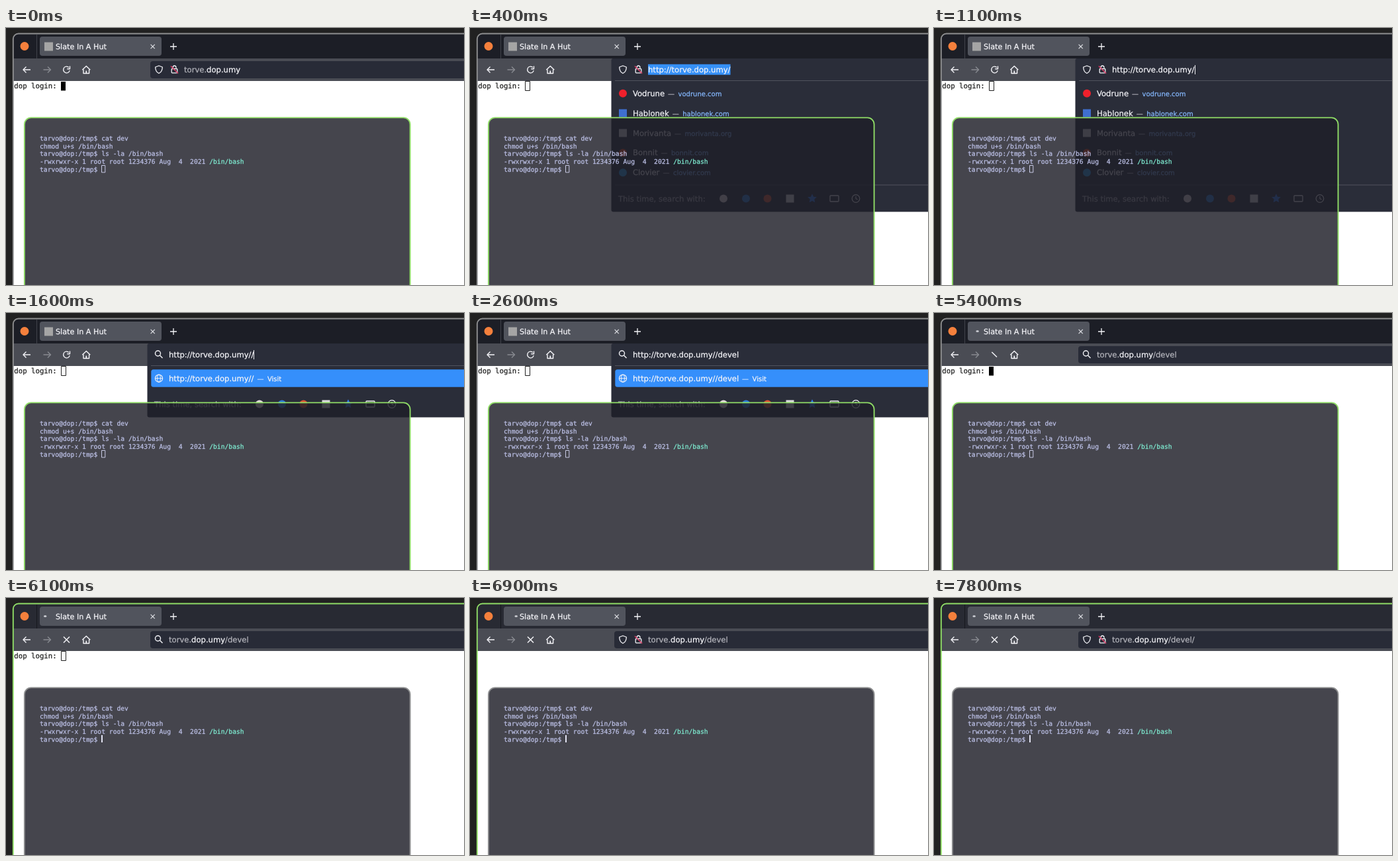
These frames come from a looping animation (692x388 px, 8 s). An HTML page with a canvas:

```html
<!DOCTYPE html>
<html lang="en">
<head>
<meta charset="utf-8">
<title>Browser and terminal</title>
<style>
  html, body { margin: 0; width: 100%; height: 100%; overflow: hidden; background: #212121; }
  canvas { display: block; }
</style>
</head>
<body>
<canvas id="stage" width="692" height="388"></canvas>
<script>
const ctx = document.getElementById('stage').getContext('2d');
const LOOP = 8000;
const SANS = '"DejaVu Sans", sans-serif';
const MONO = '"DejaVu Sans Mono", monospace';
const WHITE = '#f4f4f8', MUTED = '#b2b3ba', GREEN = '#8fdc66', GREY = '#8e8f90';
const HOST = 'http://torve.dop.umy/';
const URL_SIZE = 11.6;

// Moments when the loading dot is redrawn
const DOT_TIMES = [5400, 5700, 6000, 6100, 6200, 6300, 6800, 6900, 7300, 7400, 7500, 7800];

// Typed address: start time, text after the host, caret index from the end (-1 hides it)
const TYPING = [
  [1600, '/', 0], [2100, '/de', 0], [2300, '/devel', 0], [2600, '/devel', -1],
  [3000, '/devel', 5], [3500, 'devel', 5], [3800, 'devel', -1]
];

const SITES = [
  ['Vodrune', 'vodrune.com', '#f0202c', 'circle'],
  ['Hablonek', 'hablonek.com', '#3f6fd0', 'square'],
  ['Morivanta', 'morivanta.org', '#d8d8da', 'square'],
  ['Bonnit', 'bonnit.com', '#f04a22', 'circle'],
  ['Clovier', 'clovier.com', '#2a9fe8', 'circle']
];

// A hairline outline gives the slightly heavy look of rescaled screen text
function text(str, x, y, size, color, family = SANS) {
  ctx.font = `${size}px ${family}`;
  ctx.fillStyle = ctx.strokeStyle = color;
  ctx.lineWidth = 0.25;
  ctx.fillText(str, x, y);
  ctx.strokeText(str, x, y);
  return x + ctx.measureText(str).width;
}

function rect(x, y, w, h, color) {
  ctx.fillStyle = color;
  ctx.fillRect(x, y, w, h);
}

function box(x, y, w, h, r, fill, stroke, width = 1) {
  ctx.beginPath();
  ctx.roundRect(x, y, w, h, r);
  if (fill) { ctx.fillStyle = fill; ctx.fill(); }
  if (stroke) { ctx.strokeStyle = stroke; ctx.lineWidth = width; ctx.stroke(); }
}

function line(points, color, width = 1.3) {
  ctx.beginPath();
  points.forEach(([x, y]) => ctx.lineTo(x, y));
  ctx.strokeStyle = color;
  ctx.lineWidth = width;
  ctx.stroke();
}

function ring(x, y, rx, color, width = 1.2, ry = rx, from = 0, to = Math.PI * 2) {
  ctx.beginPath();
  ctx.ellipse(x, y, rx, ry, 0, from, to);
  ctx.strokeStyle = color;
  ctx.lineWidth = width;
  ctx.stroke();
}

function disc(x, y, rx, color, ry = rx) {
  ctx.beginPath();
  ctx.ellipse(x, y, rx, ry, 0, 0, Math.PI * 2);
  ctx.fillStyle = color;
  ctx.fill();
}

function badge(shape, x, y, color) {
  if (shape === 'circle') disc(x, y, 6, color);
  else rect(x - 6, y - 6, 12, 12, color);
}

function cross(x, y, r, color, width) {
  line([[x - r, y - r], [x + r, y + r]], color, width);
  line([[x + r, y - r], [x - r, y + r]], color, width);
}

function arrow(x, y, dir, color) {
  line([[x - 5.5, y], [x + 5.5, y]], color, 1.4);
  line([[x + dir, y - 4.5], [x + dir * 5.5, y], [x + dir, y + 4.5]], color, 1.4);
}

function searchIcon() {
  ring(229.5, 61, 4, WHITE, 1.4);
  line([[232.5, 64], [236.5, 68]], WHITE, 1.5);
}

function securityIcons() {
  ctx.beginPath();
  ctx.moveTo(231, 57);
  ctx.lineTo(236.3, 59);
  ctx.quadraticCurveTo(236.3, 66, 231, 68.5);
  ctx.quadraticCurveTo(225.7, 66, 225.7, 59);
  ctx.closePath();
  ctx.strokeStyle = WHITE;
  ctx.lineWidth = 1.3;
  ctx.stroke();
  ring(254.5, 60.5, 2.6, WHITE, 1.3, 3.5, Math.PI, 0);
  box(250.2, 61.5, 8.6, 6.3, 1, null, WHITE, 1.3);
  line([[249, 57.5], [260, 68.5]], '#e2406c', 1.5);
}

function reloadIcon(t) {
  if (t < 5400) {
    ring(91.5, 63, 4.8, WHITE, 1.4, 4.8, 0.25, 5.5);
    line([[96.5, 57.5], [96.5, 61.7], [92.3, 61.7]], WHITE, 1.4);
  } else if (t < 5700) {
    line([[87.3, 59], [95, 66.5]], WHITE, 1.5);
  } else {
    cross(91.5, 63, 4.5, WHITE, 1.5);
  }
}

function tabs(t, active) {
  rect(10, 8, 682, 38, active ? '#282a33' : '#1c1e26');
  disc(28, 27.5, 6.5, '#f5803c');
  rect(46, 10, 1, 36, active ? '#17181f' : '#41434b');
  box(51, 13, 184, 29, 4, '#51545d');
  if (t < 5400) {
    rect(58, 21.5, 13, 13, '#a5a5a5');
  } else {
    const at = DOT_TIMES.filter(m => m <= t).pop();
    const x = 64.5 - 5.3 * Math.cos((at - 6100) / 545 * Math.PI * 2);
    disc(x, 27.5, 2.3, '#c6c8ce', 1.6);
  }
  text('Slate In A Hut', 75, 32, 11.2, WHITE);
  cross(221.7, 28, 3.1, '#dddee3', 1.2);
  line([[248, 28], [258, 28]], WHITE);
  line([[253, 23], [253, 33]], WHITE);
}

function toolbar(t) {
  rect(10, 46, 682, 34, '#4a4c54');
  arrow(31.5, 63, -1, WHITE);
  arrow(62, 63, 1, '#888a91');
  reloadIcon(t);
  line([[115.3, 63.2], [121.3, 57.5], [127.3, 63.2]], WHITE, 1.4);
  line([[117, 62.5], [117, 68.5], [125.6, 68.5], [125.6, 62.5]], WHITE, 1.4);
  line([[121.3, 68], [121.3, 64.5]], WHITE, 1.8);
}

function restingAddress(t) {
  box(218, 50, 490, 26, 4, '#282b37');
  const secure = t < 100 || t >= 6800;
  if (secure) securityIcons(); else searchIcon();
  let x = text('torve.', secure ? 269 : 246, 66.6, URL_SIZE, MUTED);
  x = text('dop.umy', x, 66.6, URL_SIZE, WHITE);
  const path = t < 100 ? '' : t < 7800 ? '/devel' : '/devel/';
  text(path, x, 66.6, URL_SIZE, MUTED);
}

function star(x, y, r, color) {
  ctx.beginPath();
  for (let i = 0; i < 10; i++) {
    const a = i * Math.PI / 5 - Math.PI / 2, d = i % 2 ? r * 0.48 : r;
    ctx.lineTo(x + d * Math.cos(a), y + d * Math.sin(a));
  }
  ctx.closePath();
  ctx.fillStyle = color;
  ctx.fill();
}

function searchRow(y) {
  text('This time, search with:', 224, y + 4.3, URL_SIZE, MUTED);
  badge('circle', 383, y, '#e6dede');
  badge('circle', 417, y, '#2c7fd8');
  badge('circle', 449.5, y, '#de5833');
  badge('square', 483.5, y, '#dcdcde');
  star(517, y, 7.2, '#2f7df0');
  box(544, y - 4.5, 13, 9, 1, null, WHITE, 1.3);
  ring(583, y, 5.8, WHITE);
  line([[583, y - 3.5], [583, y], [585.5, y + 1.5]], WHITE, 1.1);
}

function panel(bottom) {
  box(213.5, 46, 500, bottom - 46, 3, '#2a2d39');
  rect(219, 79, 473, 1, '#50535e');
}

function caret(x) {
  rect(Math.round(x), 56, 1, 14, WHITE);
}

function suggestions(t) {
  panel(277.5);
  securityIcons();
  const selected = t < 1000;
  ctx.font = `${URL_SIZE}px ${SANS}`;
  if (selected) rect(269, 54.7, ctx.measureText(HOST).width, 16, '#3590f8');
  const end = text(HOST, 269, 66.6, URL_SIZE, WHITE);
  if (!selected) caret(end);
  SITES.forEach(([name, url, color, shape], i) => {
    const y = 98.7 + i * 29.9;
    badge(shape, 231, y, color);
    const x = text(name, 246, y + 4, URL_SIZE, WHITE);
    text('—', x + 5, y + 4, 10, MUTED);
    text(url, x + 20.5, y + 4, 10, '#84b6fb');
  });
  rect(219, 236.5, 473, 1, '#50535e');
  searchRow(257.5);
}

function typedAddress(t) {
  const [, tail, back] = TYPING.filter(s => s[0] <= t).pop();
  const address = HOST + tail;
  panel(157.5);
  searchIcon();
  text(address, 246, 66.6, URL_SIZE, WHITE);
  if (back >= 0) {
    const before = address.slice(0, address.length - back);
    caret(246 + ctx.measureText(before).width);
  }
  box(219.3, 85.3, 490, 26.5, 3.5, '#358ffb');
  ring(231, 98.7, 5.6, WHITE);
  ring(231, 98.7, 2.5, WHITE, 1, 5.6);
  line([[225.5, 98.7], [236.5, 98.7]], WHITE, 1);
  const end = text(address, 246, 102.7, URL_SIZE, WHITE);
  text('—', end + 5, 102.7, 10, '#c9e0ff');
  text('Visit', end + 20.5, 102.7, 10, WHITE);
  searchRow(137.5);
}

function page(t) {
  rect(11, 80, 681, 308, '#fff');
  if (t >= 6800) return;
  text('dop login:', 12.3, 91, 10.7, '#222', MONO);
  const focused = t < 100 || (t >= 5400 && t < 5700);
  if (focused) rect(83, 81, 7, 13.5, '#000');
  else box(83.5, 80.5, 7, 14, 0, null, '#222', 1);
}

function terminal(active) {
  box(27.9, 135.4, 582.7, 270, 10, 'rgba(31,31,41,.826)', active ? GREY : GREEN, 1.9);
  const prompt = 'tarvo@dop:/tmp$ ';
  const rows = [
    prompt + 'cat dev', 'chmod u+s /bin/bash', prompt + 'ls -la /bin/bash',
    '-rwxrwxr-x 1 root root 1234376 Aug  4  2021 ', prompt
  ];
  rows.forEach((row, i) => {
    const y = 170.2 + i * 11.6;
    const x = text(row, 51, y, 9.68, '#bcc0e6', MONO);
    if (i === 3) text('/bin/bash', x, y, 9.68, '#7eead0', MONO);
  });
  if (active) rect(144, 207, 2, 11, '#e2e3f2');
  else box(144.5, 207.5, 5.3, 10.5, 0, null, '#c8cae4', 1);
}

function draw(t) {
  const active = t >= 5700;
  rect(0, 0, 692, 388, '#212121');
  ctx.save();
  ctx.beginPath();
  ctx.roundRect(10.8, 8.5, 720, 420, 8);
  ctx.clip();
  tabs(t, active);
  toolbar(t);
  page(t);
  if (t < 100 || t >= 5400) restingAddress(t);
  else if (t < 1600) suggestions(t);
  else typedAddress(t);
  ctx.restore();
  box(10.8, 8.5, 720, 420, 8, null, active ? GREEN : GREY, 1.9);
  terminal(active);
}

ctx.textRendering = 'geometricPrecision';
ctx.lineJoin = 'round';

function tick() {
  draw(performance.now() % LOOP);
  requestAnimationFrame(tick);
}
tick();
</script>
</body>
</html>
```
